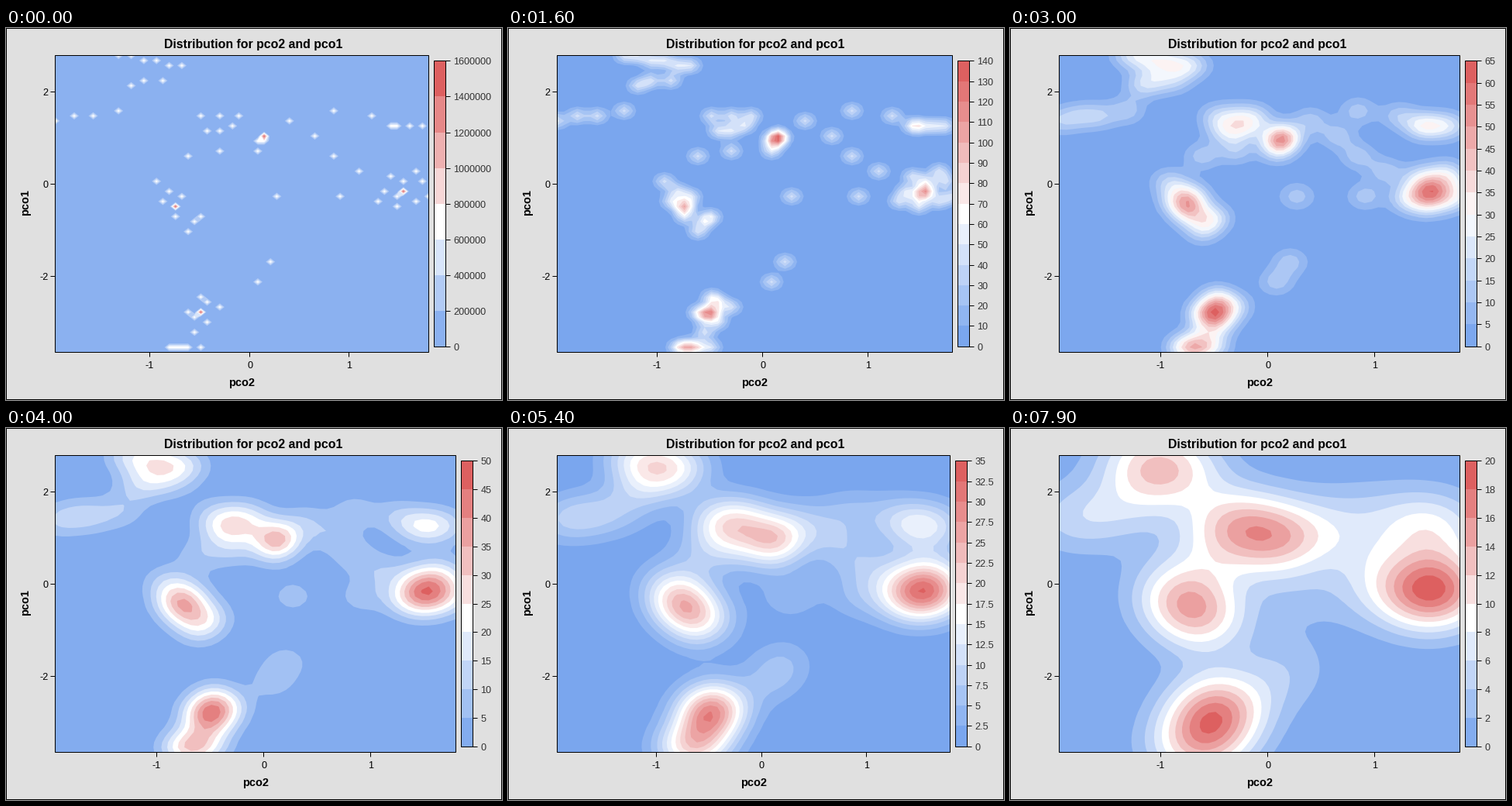
A matplotlib script that plays this animation: 640x480 px, repeating every 8000 ms.

```python
import numpy as np
import matplotlib.pyplot as plt
from matplotlib.animation import FuncAnimation
from matplotlib.patches import Rectangle

W, H = 640, 480
FRAMES, INTERVAL = 80, 100
PT = 0.72  # points per pixel at 100 dpi

LEFT, TOP, BOTTOM = 63.5, 35.5, 418.5
X_MIN, X_MAX = -1.947, 1.797
Y_MIN, Y_MAX = -3.656, 2.79
BAR_TOP, BAR_BOTTOM = 42.9, 411.3
GRID = 60
DX = (X_MAX - X_MIN) / (GRID - 1)
DY = (Y_MAX - Y_MIN) / (GRID - 1)
HX, HY = 7.71 * DX, 8.03 * DY  # full bandwidths
MAX_BANDS = 14

LOW, MID, HIGH = (np.array(c) / 255 for c in
                  [(100, 151, 235), (255, 255, 255), (221, 96, 96)])

counts = np.zeros((GRID, GRID))  # rows run from the top
offsets = np.subtract.outer(np.arange(GRID), np.arange(GRID))


def add(cols, rows):
    cols, rows = (np.clip(np.round(v), 0, GRID - 1).astype(int)
                  for v in (cols, rows))
    np.add.at(counts, (rows, cols), 1)


def trail(n, start, end):
    """Evenly spaced observations along a straight line."""
    add(*np.linspace(start, end, n).T)


def swarm(n, centre, radii, lean=0):
    """Sunflower cluster with a double core, sheared by lean."""
    j = np.maximum(np.arange(n) - 1, 0)
    r, angle = np.sqrt(j / (n - 2)), np.radians(137.5) * j
    dy = radii[1] * r * np.sin(angle)
    dx = radii[0] * r * np.cos(angle) + lean * dy
    add(centre[0] + dx, centre[1] + dy)


# Upper left
trail(6, (10, 0), (20, 2))
trail(3, (12, 5.6), (17, 5))
trail(4, (-0.4, 12.7), (9.8, 11.2))
# Middle
trail(3, (23, 12), (28.6, 12))
trail(3, (24, 15.4), (28, 14))
trail(3, (21, 19.6), (31.6, 19))
trail(4, (32.3, 17.2), (33.4, 15.6))
swarm(10, (19.4, 30.2), (3.1, 6.3), 0.45)
# Right
trail(4, (37, 13), (48, 23))
trail(2, (44, 11), (50, 12))
trail(4, (52.6, 14), (57.8, 14))
trail(2, (35, 28), (45, 28))
swarm(12, (55.2, 27), (4.9, 4.43))
# Bottom
trail(2, (34, 41), (32, 45))
swarm(9, (23.4, 51.4), (3.5, 4), -0.28)
trail(5, (17.6, 58), (22.6, 58))

plt.rcParams["font.family"] = "Liberation Sans"
fig = plt.figure(figsize=(W / 100, H / 100), dpi=100, facecolor="#e0e0e0")
ax = fig.add_axes([0, 0, 1, 1])


def kernel(step, h):
    return np.exp(-0.5 * (offsets * step / h) ** 2)


def density(i):
    """Gaussian kernel estimate whose bandwidth grows with the frame."""
    bw = 0.001 + 0.008 * i
    hx, hy = HX * bw, HY * bw
    return kernel(DY, hy) @ counts @ kernel(DX, hx) / (np.pi * hx * hy)


def nice_levels(peak):
    """Smallest round step that needs no more than MAX_BANDS bands."""
    power = 10.0 ** (np.floor(np.log10(peak)) - 2)
    while True:
        for m in (1, 2, 2.5, 5):
            n = int(np.ceil(peak / (m * power) - 1e-9))
            if n <= MAX_BANDS:
                return np.arange(n + 1) * m * power
        power *= 10


def ramp(t):
    if t <= 0.5:
        return LOW + (MID - LOW) * 2 * t
    return MID + (HIGH - MID) * (2 * t - 1)


def label_width(s):
    return 7 * len(s) - 3.5 * s.count(".")


def mid_pixel(v):
    return np.floor(v) + 0.5


def line(x0, y0, x1, y1):
    ax.plot([x0, x1], [y0, y1], color="black", lw=PT, snap=False,
            solid_capstyle="butt", zorder=5)


def box(x0, y0, x1, y1, fill="none", edge="black", z=5):
    ax.add_patch(Rectangle((x0, y0), x1 - x0, y1 - y0, facecolor=fill,
                           edgecolor=edge, lw=PT if edge != "none" else 0,
                           snap=False, zorder=z))


def text(x, y, s, size=12.6, ha="center", color="black", **kw):
    ax.text(x, y, s, fontsize=size * PT, ha=ha, va="baseline", color=color,
            rotation_mode="anchor", zorder=6, **kw)


def draw_axes(right):
    box(LEFT, TOP, right, BOTTOM)
    for v in (-1, 0, 1):
        x = mid_pixel(LEFT + (v - X_MIN) / (X_MAX - X_MIN) * (right - LEFT))
        line(x, BOTTOM, x, BOTTOM + 6)
        text(x, 439, str(v))
    for v in (-2, 0, 2):
        y = mid_pixel(TOP + (Y_MAX - v) / (Y_MAX - Y_MIN) * (BOTTOM - TOP))
        line(LEFT - 6, y, LEFT, y)
        text(55, y + 4.5, str(v), ha="right")
    text((LEFT + right) / 2, 462, "pco2", 14.5, weight="bold")
    text(29.5, 225, "pco1", 14.5, weight="bold", rotation=90)
    text(319, 26, "Distribution for pco2 and pco1", 15.9, weight="bold")


def draw_bar(x, labels, colors):
    ys = mid_pixel(np.linspace(BAR_BOTTOM, BAR_TOP, len(labels)))
    for y0, y1, c in zip(ys, ys[1:], colors):
        box(x, y1 - 0.5, x + 15, y0 - 0.5, c, "none", 2)
    box(x, ys[-1], x + 15, ys[0])
    for y, s in zip(ys, labels):
        line(x + 15, y, x + 21, y)
        text(x + 25, y + 4.5, s, ha="left", color="#333333")


def draw(i):
    ax.cla()
    z = density(i)
    levels = nice_levels(z.max())
    n = len(levels) - 1
    colors = [ramp((b + 1) / n) for b in range(n)]
    labels = [f"{round(v, 1):.10g}" for v in levels]
    right = np.ceil(594 - max(map(label_width, labels))) + 0.5

    # Stacked fills leave no seams between bands
    box(LEFT, TOP, right, BOTTOM, colors[0], "none", 1)
    xs = np.linspace(LEFT, right, GRID)
    ys = np.linspace(TOP, BOTTOM, GRID)
    for level, color in zip(levels[1:-1], colors[1:]):
        ax.contourf(xs, ys, z, [level, levels[-1] * 1.01], colors=[color],
                    antialiased=True, zorder=2)

    draw_axes(right)
    draw_bar(right + 7, labels, colors)
    box(0.5, 0.5, W - 0.5, H - 0.5)
    ax.set_xlim(0, W)
    ax.set_ylim(H, 0)
    ax.axis("off")
    return []


anim = FuncAnimation(fig, draw, frames=FRAMES, interval=INTERVAL, repeat=True)
plt.show()
```
